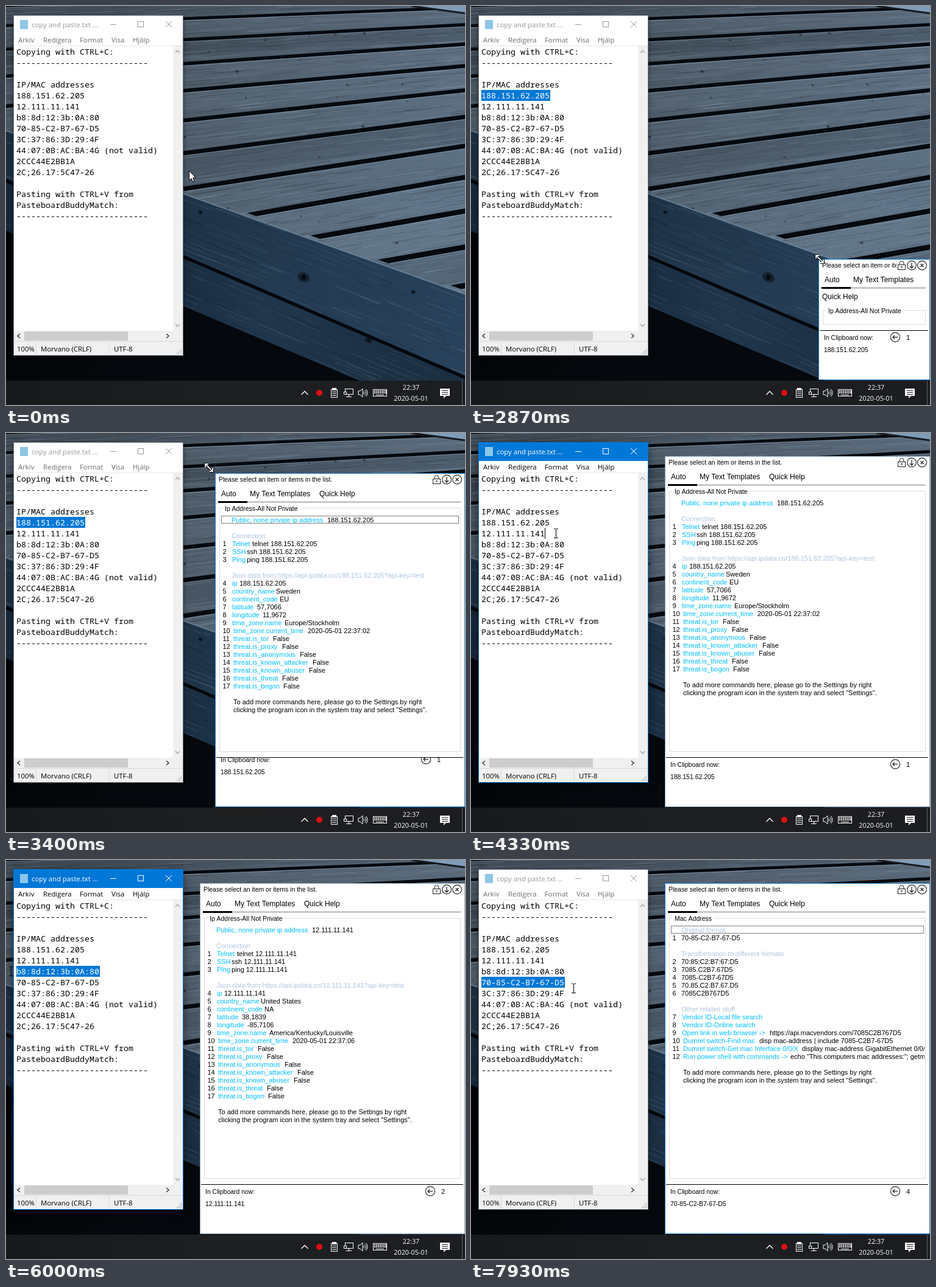
Recreate the animation shown at these times as an HTML page with a canvas. Size 753 by 656 pixels, loop 8000 ms.

```html
<!DOCTYPE html>
<html lang="sv">
<head>
<meta charset="utf-8">
<style>
html, body { margin: 0; width: 753px; height: 656px; overflow: hidden; background: #05070b; }
canvas { display: block; }
</style>
</head>
<body>
<canvas id="stage" width="753" height="656"></canvas>
<script>
const W = 753, H = 656, LOOP = 8000, BLUE = '#0078d7';
const stage = document.getElementById('stage').getContext('2d');
let c = stage;

function layer() {
  const canvas = document.createElement('canvas');
  canvas.width = W; canvas.height = H;
  return canvas.getContext('2d');
}
function drawOn(target, draw) { c = target; draw(); c = stage; }

const SANS = '"Liberation Sans", Arial, sans-serif';
const LIST = '11px ' + SANS, SMALL = '10.45px ' + SANS, TAB = '12px ' + SANS;
const UI = '11.35px "Open Sans", sans-serif';
const CLOCK = '10.8px "Open Sans", sans-serif';
const MONO = '13.33px "Noto Sans Mono", monospace';

// y is the middle of the text line
function text(s, x, y, color = '#000', font = LIST, align = 'left') {
  c.font = font; c.fillStyle = color; c.textAlign = align;
  c.fillText(s, x, y + (font === MONO ? 5 : 4));
}
function box(x, y, w, h, color) { c.fillStyle = color; c.fillRect(x, y, w, h); }
function frame(x, y, w, h, color) {
  c.strokeStyle = color; c.lineWidth = 1; c.strokeRect(x + .5, y + .5, w - 1, h - 1);
}
function poly(points, color) {
  c.beginPath(); points.forEach(p => c.lineTo(...p)); c.closePath();
  c.fillStyle = color; c.fill();
}
function line(points, color = '#000', width = 1) {
  c.beginPath(); points.forEach(p => c.lineTo(...p));
  c.strokeStyle = color; c.lineWidth = width; c.stroke();
}
function disc(x, y, r, color, stroke) {
  c.beginPath(); c.arc(x, y, r, 0, 7);
  if (color) { c.fillStyle = color; c.fill(); }
  if (stroke) { c.strokeStyle = stroke; c.lineWidth = 1.1; c.stroke(); }
}
function clipped(points, draw) {
  c.save(); c.beginPath(); points.forEach(p => c.lineTo(...p)); c.closePath(); c.clip();
  draw(); c.restore();
}
const rectPath = (x, y, w, h) => [[x, y], [x + w, y], [x + w, y + h], [x, y + h]];
function gradient(x0, y0, x1, y1, ...colors) {
  const g = c.createLinearGradient(x0, y0, x1, y1);
  colors.forEach((col, i) => g.addColorStop(i / (colors.length - 1), col));
  return g;
}

// ---------- desktop ----------
let seed = 7;
const rnd = () => (seed = seed * 16807 % 2147483647) / 2147483647;

// Plank seams fan out towards the viewer: height at the right side, and slope
const seam = k => k * (26 + 1.95 * k);
const lean = y => Math.min(.175, .04 + .0005 * y);
const seamAt = (k, x) => seam(k) + lean(seam(k)) * (W - x);

function grain(count, y0, y1, slope) {
  for (let i = 0; i < count; i++) {
    const x = rnd() * W * 1.1 - 60, y = y0 + rnd() * (y1 - y0), len = 15 + rnd() * 80;
    c.globalAlpha = .04 + rnd() * .14;
    line([[x, y], [x + len, y + len * slope(y)]], rnd() < .5 ? '#05080c' : '#a3b8cc', .6 + rnd());
  }
  c.globalAlpha = 1;
}
function knot(x, y, r) {
  c.beginPath(); c.ellipse(x, y, r * 1.3, r, .4, 0, 7); c.fillStyle = 'rgba(5,9,14,.5)'; c.fill();
  disc(x, y, r * .5, '#070b10');
}
function drawDesktop() {
  box(0, 0, W, H, gradient(0, 400, 200, 616, '#020306', '#05080d'));
  const edge = x => 205 + .357 * x, beam = x => 284 + .43 * x, foot = x => 370 + .424 * x;
  const strip = (a, b) => [[0, a(0)], [W, a(W)], [W, b(W)], [0, b(0)]];
  const band = (k, from, to) => [[0, seamAt(k, 0) + from], [W, seamAt(k, W) + from], [W, seamAt(k, W) + to], [0, seamAt(k, 0) + to]];
  const deck = [[0, 0], [665, 0], [W, 12], [W, edge(W)], [0, edge(0)]];

  box(640, 0, 113, 16, '#7f9cb9');
  clipped(deck, () => {
    box(0, 0, W, H, gradient(150, 0, 620, 420, '#434e59', '#526170', '#5d7083'));
    for (let k = -2; k < 12; k++)
      poly(band(k, 0, 24 + 4 * Math.max(k, 0)), rnd() < .5 ? `rgba(10,18,28,${rnd() * .18})` : `rgba(150,175,200,${rnd() * .13})`);
    grain(2600, 0, 520, y => -lean(y * .8));
    c.globalAlpha = .5;
    for (let i = 0; i < 40; i++) knot(rnd() * W, rnd() * 420, 1 + rnd() * 1.6);
    c.globalAlpha = 1;
    clipped([[0, 0], [W, 0], [W, edge(W) - 6], [0, edge(0) - 6]], () => {
      for (let k = -2; k < 12; k++) {
        const w = 5 + Math.max(k, 0) * .45;
        poly(band(k, 0, w), '#06090e');
        poly(band(k, w, w + 1.3), 'rgba(165,188,208,.4)');
      }
    });
  });
  line([[665, 0], [W, 12]], '#151b22', 3);

  clipped(strip(edge, beam), () => {
    box(0, 200, W, 456, gradient(200, 280, 700, 600, '#1b2e40', '#233a51', '#28425c'));
    grain(900, 200, 620, () => .39);
    knot(488, 446, 8); knot(319, 339, 3); knot(668, 470, 3);
  });
  clipped(strip(x => beam(x) + 6, foot), () => {
    box(0, 280, W, 376, gradient(200, 400, 640, 616, '#16273a', '#20364c', '#1c3044'));
    grain(700, 280, 620, () => .42);
    knot(595, 549, 5);
  });
  line([[0, edge(0)], [W, edge(W)]], 'rgba(132,158,182,.6)', 2);
  drawTaskbar();
}
function drawTaskbar() {
  const ink = '#fff', bar = '#1b1d20';
  box(0, 616, W, 40, gradient(0, 0, W, 0, '#17191c', '#1d1f21', bar));
  line([[484.5, 639], [490, 633.5], [495.5, 639]], ink, 1.3);
  disc(514, 636, 5, '#e01010');
  frame(533, 630, 11, 14, ink); box(535, 628, 7, 4, ink);
  for (let y = 634; y < 642; y += 3) box(535, y, 7, 1, ink);
  frame(556, 629, 14, 10, ink); box(562, 639, 1, 4, ink); box(558, 642, 9, 1, ink);
  box(554, 634, 5, 5, bar); frame(554, 634, 5, 5, ink);
  line([[578, 633], [581, 633], [585, 629], [585, 643], [581, 639], [578, 639], [578, 633]], ink);
  [3, 6, 8.5].forEach(r => { c.beginPath(); c.arc(584.5, 636, r, -.8, .8); c.stroke(); });
  frame(602, 630, 23, 12, ink);
  for (let x = 604; x < 623; x += 3) { box(x, 632, 2, 2, ink); box(x, 635, 2, 2, ink); }
  box(607, 639, 13, 1, ink);
  text('22:37', 664.5, 627, ink, CLOCK, 'center');
  text('2020-05-01', 664.5, 645, ink, CLOCK, 'center');
  poly([[712, 629], [728, 629], [728, 641], [722, 641], [718, 645], [718, 641], [712, 641]], ink);
  for (let y = 632; y < 640; y += 3) box(715, y, 10, 1, bar);
  box(748, 616, 1, 40, '#62666a');
}

// ---------- timeline ----------
const POINTER = [
  [70, 300, 271], [470, 160, 146], [670, 160, 146], [1000, 5, 147], [1200, 5, 147], [1330, 25, 159],
  [1470, 25, 159], [2200, 567, 424], [2330, 564, 424], [2470, 564, 424], [2600, 572, 416], [2870, 572, 416],
  [3400, 333, 57], [3530, 308, 35], [3670, 320, 39], [3800, 320, 39], [4130, 139, 165], [4330, 139, 165],
  [4530, 8, 165], [4870, 8, 165], [5330, 160, 183], [5530, 160, 183], [6000, 8, 183], [6330, 8, 183],
  [6800, 160, 201], [6930, 160, 201], [7400, 12, 202], [7600, 12, 202], [7930, 168, 211]];
const CORNER = [[2900, 570, 416], [3400, 343, 66], [3530, 312, 38], [3670, 318, 38]];
// Each pass: start and end of the drag over a line, then the copy
const PASSES = [[670, 1000, 1470], [4330, 4530, 4870], [5530, 6000, 6330], [6930, 7400, 7600]];

function at(keys, t) {
  const i = keys.findIndex(k => k[0] > t);
  if (i === 0) return keys[0].slice(1);
  if (i < 0) return keys[keys.length - 1].slice(1);
  const [t0, x0, y0] = keys[i - 1], [t1, x1, y1] = keys[i];
  const u = (t - t0) / (t1 - t0), e = u * u * (3 - 2 * u);
  return [x0 + (x1 - x0) * e, y0 + (y1 - y0) * e];
}

// ---------- text editor ----------
const RULE = '-'.repeat(27);
const ADDRESSES = ['188.151.62.205', '12.111.11.141', 'b8:8d:12:3b:0A:80', '70-85-C2-B7-67-D5'];
const LINES = ['Copying with CTRL+C:', RULE, '', 'IP/MAC addresses', ...ADDRESSES,
  '3C:37:86:3D:29:4F', '44:07:0B:AC:BA:4G (not valid)', '2CCC44E2BB1A', '2C;26.17:5C47-26', '',
  'Pasting with CTRL+V from', 'PasteboardBuddyMatch:', RULE];

function drawEditor(t, active) {
  c.save();
  c.shadowColor = 'rgba(0,0,0,.55)'; c.shadowBlur = active ? 16 : 8; c.shadowOffsetY = 2;
  box(13, 16, 277, 558, '#fff');
  c.restore();
  const ink = active ? '#fff' : '#999';
  if (active) box(13, 16, 277, 30, BLUE);
  box(23, 23, 13, 15, '#8cc7e6');
  text('copy and paste.txt ...', 42, 31, ink, UI);
  box(171, 30, 10, 1, ink);
  frame(216, 25, 10, 10, ink);
  line([[262, 25], [272, 35]], ink); line([[272, 25], [262, 35]], ink);
  [['Arkiv', 20], ['Redigera', 61], ['Format', 121], ['Visa', 173], ['Hjälp', 208]]
    .forEach(([s, x]) => text(s, x, 56, active ? '#000' : '#6d6d6d', UI));
  box(13, 65, 277, 1, '#e6e6e6');

  LINES.forEach((s, i) => text(s, 17, 75 + 18 * i, '#000', MONO));
  const row = PASSES.filter(p => t >= p[0]).length - 1;
  if (row >= 0) {
    const [from, to] = PASSES[row], s = ADDRESSES[row], y = 147 + 18 * row;
    const x = at(POINTER, Math.max(from, Math.min(t, to)))[0];
    const col = Math.max(0, Math.min(s.length, Math.round((x - 17) / 8)));
    if (col < s.length) {
      box(17 + col * 8, y - 9, (s.length - col) * 8 + 1, 18, BLUE);
      text(s.slice(col), 17 + col * 8, y, '#fff', MONO);
    } else box(17 + col * 8, y - 9, 1, 18, '#000');
  }

  box(274, 66, 16, 468, '#f0f0f0');
  line([[278, 77], [281.5, 73], [285, 77]], '#a6a6a6', 1.3);
  line([[278, 523], [281.5, 527], [285, 523]], '#a6a6a6', 1.3);
  box(13, 534, 277, 40, '#f0f0f0');
  box(30, 535, 170, 15, '#cdcdcd');
  line([[23, 539], [19, 542.5], [23, 546]], '#404040', 1.6);
  line([[263, 539], [267, 542.5], [263, 546]], '#404040', 1.6);
  box(13, 551, 277, 1, '#d7d7d7');
  box(49, 553, 1, 20, '#d7d7d7'); box(169, 553, 1, 20, '#d7d7d7');
  text('100%', 18, 564, '#000', UI);
  text('Morvano (CRLF)', 57, 564, '#000', UI);
  text('UTF-8', 177, 564, '#000', UI);
  for (let i = 0; i < 3; i++) for (let j = 0; j <= i; j++) box(286 - j * 3, 564 + i * 3, 2, 2, '#bfbfbf');
  frame(12, 15, 279, 560, active ? BLUE : '#6d757d');
}

// ---------- popup ----------
const HINT = [[], ['', 'To add more commands here, please go to the Settings by right', 30],
  ['', 'clicking the program icon in the system tray and select "Settings".', 30]];

// Rows: [label, value, value offset, kind], numbered rows have kind 1, headings 2
function ipRows(ip, place) {
  const [country, continent, lat, lon, zone, sec] = place;
  const no = (name, x) => ['threat.is_' + name, 'False', x, 1];
  return [['Public, none private ip address', ip, 184], [], ['Connection', '', 0, 2],
    ['Telnet', 'telnet ' + ip, 61, 1], ['SSH', 'ssh ' + ip, 52, 1], ['Ping', 'ping ' + ip, 52, 1], [],
    [`Json data from https://api.ipdata.co/${ip}?api-key=test`, '', 0, 2],
    ['ip', ip, 40, 1], ['country_name', country, 100, 1], ['continent_code', continent, 106, 1],
    ['latitude', lat, 69, 1], ['longitude', lon, 78, 1], ['time_zone.name', zone, 114, 1],
    ['time_zone.current_time', '2020-05-01 22:37:' + sec, 152, 1],
    no('tor', 95), no('proxy', 110), no('anonymous', 139), no('known_attacker', 160),
    no('known_abuser', 154), no('threat', 110), no('bogon', 112), ...HINT];
}
function macRows(mac) {
  const hex = mac.replace(/[^0-9a-f]/gi, '').toUpperCase();
  const join = (n, sep) => hex.match(new RegExp(`.{${n}}`, 'g')).join(sep);
  const forms = [join(2, mac.includes(':') ? '-' : ':'), join(4, '.'), join(4, '-'), join(2, '.'), hex];
  return [['Original format', '', 0, 2], ['', mac, 27, 1], [],
    ['Transformation to different formats', '', 0, 2], ...forms.map(f => ['', f, 27, 1]), [],
    ['Other related stuff', '', 0, 2], ['Vendor ID-Local file search', '', 0, 1], ['Vendor ID-Online search', '', 0, 1],
    ['Open link in web browser ->', 'https://api.macvendors.com/' + hex, 172, 1],
    ['Dumrel switch-Find mac', 'disp mac-address | include ' + join(4, '-'), 155, 1],
    ['Dumrel switch-Get mac Interface 0/0/X', 'display mac-address GigabitEthernet 0/0/1', 225, 1],
    ['Run power shell with commands ->', 'echo "This computers mac addresses:"; getmac', 206, 1], ...HINT];
}
const VIEWS = [
  ipRows(ADDRESSES[0], ['Sweden', 'EU', '57,7066', '11,9672', 'Europe/Stockholm', '02']),
  ipRows(ADDRESSES[1], ['United States', 'NA', '38,1839', '-85,7106', 'America/Kentucky/Louisville', '06']),
  macRows(ADDRESSES[2]), macRows(ADDRESSES[3])];

function drawRows(rows, left, y) {
  let n = 0;
  rows.forEach(([label, value, offset, kind], i) => {
    const mid = y + 13 * i;
    if (kind === 1) text(++n, left + 12.5, mid);
    const indent = kind === 1 ? (n > 9 ? 30 : 28) : 27;
    if (label) text(label, left + indent, mid, kind === 2 ? '#b0c4de' : '#00bfff');
    if (value) text(value, left + offset, mid);
  });
}
function drawPopupIcons(y) {
  const ink = '#222';
  frame(700, y - 1, 13, 9, ink);
  c.beginPath(); c.arc(706.5, y - 3, 3.5, Math.PI, 0); c.lineTo(710, y - 1); c.moveTo(703, y - 3); c.lineTo(703, y - 1); c.stroke();
  disc(706.5, y + 3, 1.2, ink);
  disc(723, y + .5, 7.4, null, ink); disc(740, y + .5, 7.4, null, ink);
  line([[723, y - 4], [723, y + 5]], ink, 1.3); line([[720, y + 2], [723, y + 5], [726, y + 2]], ink, 1.3);
  line([[737.5, y - 2], [742.5, y + 3]], ink, 1.3); line([[742.5, y - 2], [737.5, y + 3]], ink, 1.3);
}
function drawPopup(t, view, active) {
  const [left, top] = at(CORNER, t).map(Math.round), wide = W - left, wrapped = wide < 250;
  c.clearRect(0, 0, W, H);
  box(left, top, wide, 615 - top, '#fff');
  clipped(rectPath(left, top, 698 - left, 40), () =>
    text('Please select an item or items in the list.', left + 6, top + 10, '#000', SMALL));
  drawPopupIcons(top + 10);

  text('Auto', left + 10, top + 34, '#000', TAB);
  text('My Text Templates', left + 57, top + 34, '#000', TAB);
  text('Quick Help', left + (wrapped ? 6 : 171), top + (wrapped ? 62 : 34), '#000', TAB);
  box(left + 53, top + 46, 693 - left, 3, '#c8c8c8');
  box(left + 5, top + 46, 48, 3, '#000');

  const group = top + (wrapped ? 84 : 57), legend = view < 2 ? 'Ip Address-All Not Private' : 'Mac Address';
  frame(left + 7, group, 739 - left, 524 - group, '#dcdcdc');
  c.font = SMALL;
  box(left + 13, group - 5, c.measureText(legend).width + 6, 11, '#fff');
  text(legend, left + 16, group + 1, '#000', SMALL);
  if (524 - group > 34) clipped(rectPath(left + 8, group + 8, 736 - left, 514 - group), () => {
    drawRows(VIEWS[view], left, group + 20);
    if (!active) {
      c.setLineDash([1, 1]); frame(left + 10, group + 13, 733 - left, 13, '#000'); c.setLineDash([]);
    }
  });

  // The footer lags behind while the window is being resized
  const [dx, dy] = t > 2930 && t < 3640 ? [-7, -8] : [0, 0];
  clipped(rectPath(left, 533, wide, 82), () => {
    text('In Clipboard now:', left + 9, 545 + dy, '#000', SMALL);
    text(ADDRESSES[view], left + 9, 565 + dy, '#000', SMALL);
    const x = 696 + dx, m = 544.5 + dy;
    disc(x, m, 7.6, null, '#222');
    line([[x - 4, m], [x + 4, m]], '#222', 1.2); line([[x - 1, m - 3], [x - 4, m], [x - 1, m + 3]], '#222', 1.2);
    text(view + 1, 714 + dx, 545 + dy);
  });
  box(left + 2, 533, 748 - left, 1, '#000');
  frame(left, top, wide, 615 - top, active ? '#8fa6b8' : '#1883d7');
}

// ---------- pointer ----------
function drawPointer(t) {
  const [x, y] = at(POINTER, t).map(Math.round);
  c.save(); c.translate(x, y);
  if (t > 2470 && t < 3800) {
    [['#000', 4], ['#fff', 1.8]].forEach(([color, w]) => {
      line([[-6, -6], [6, 6]], color, w);
      line([[-6, -1], [-6, -6], [-1, -6]], color, w);
      line([[6, 1], [6, 6], [1, 6]], color, w);
    });
  } else if (x < 274) {
    box(0, -7, 1, 15, '#000');
    [-8, 7].forEach(v => { box(-3, v, 3, 1, '#000'); box(1, v, 3, 1, '#000'); });
  } else {
    const shape = [[.5, 0], [.5, 16], [4, 12.5], [6.5, 18], [9, 17], [6.7, 11.7], [11.5, 11.5]];
    poly(shape, '#fff'); line([...shape, shape[0]], '#000');
  }
  c.restore();
}

const desktop = layer(), popup = layer();
drawOn(desktop, drawDesktop);

function render() {
  const t = performance.now() % LOOP;
  const active = PASSES.some(p => t >= p[0] && t < p[2]);
  const view = PASSES.filter(p => t >= p[2]).length - 1;
  c.drawImage(desktop.canvas, 0, 0);
  drawEditor(t, active);
  if (view >= 0) {
    drawOn(popup, () => drawPopup(t, view, active));
    c.globalAlpha = Math.min(1, .12 + (t - PASSES[0][2]) / 450);
    c.drawImage(popup.canvas, 0, 0);
    c.globalAlpha = 1;
  }
  drawPointer(t);
  requestAnimationFrame(render);
}
render();
</script>
</body>
</html>
```
